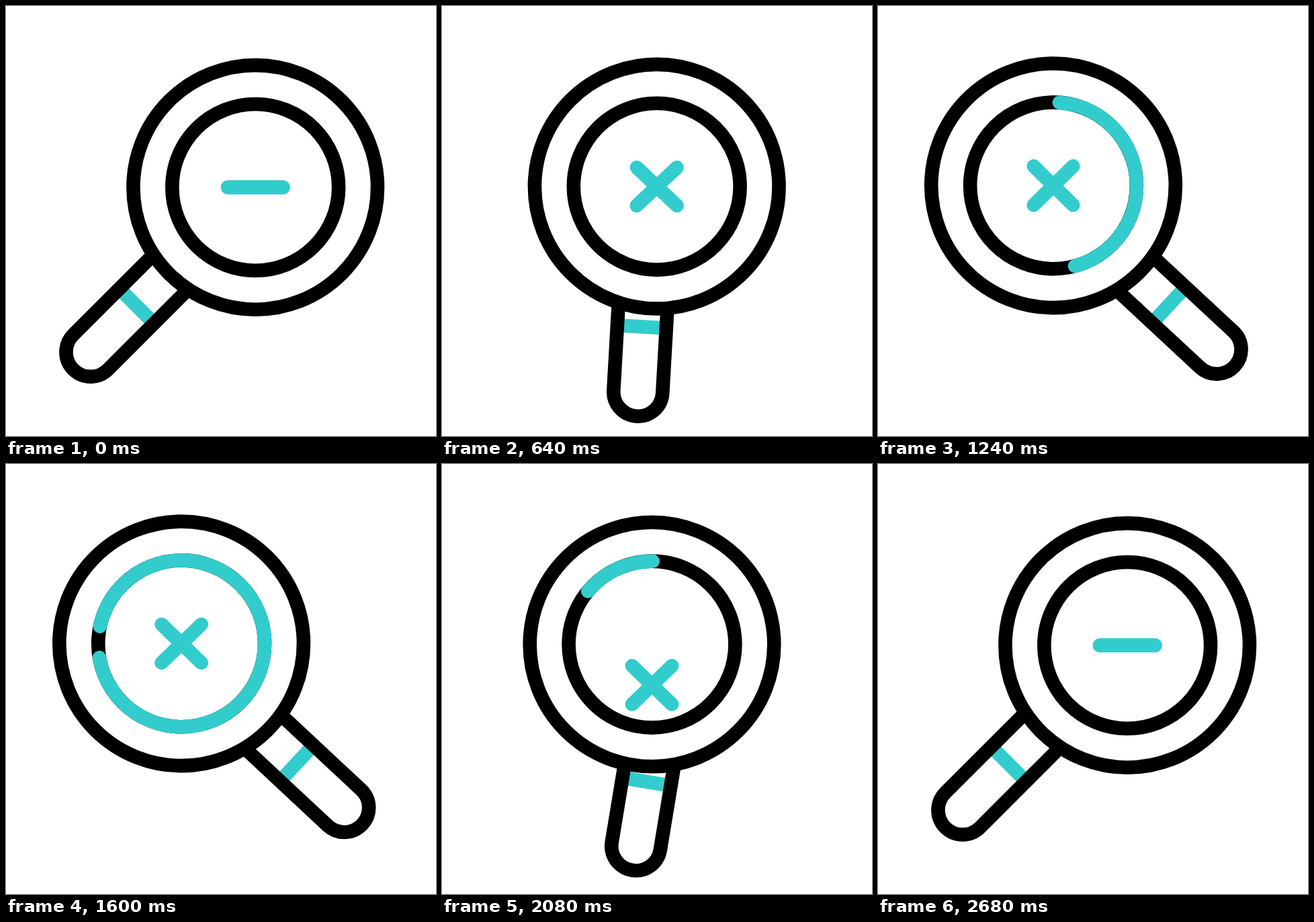
An HTML page that plays this animation: 640x640 px, repeating every 3000 ms.

```html
<!DOCTYPE html>
<html lang="en">
<head>
<meta charset="utf-8">
<title>Magnifier</title>
<style>
  html, body { margin: 0; width: 100%; height: 100%; overflow: hidden; background: #fff; }
  svg { display: block; width: 100%; height: 100%; }
</style>
</head>
<body>
<svg viewBox="0 0 640 640" fill="none" stroke="#000" stroke-width="20.6">
  <defs>
    <clipPath id="glass"><circle r="124"/></clipPath>
  </defs>
  <g id="handle">
    <path d="M-36.5 104H36.5" stroke="#3cc"/>
    <path d="M-36.5 0V201A36.5 36.5 0 0 0 36.5 201V0"/>
  </g>
  <g id="lens">
    <circle r="181.8" fill="#fff"/>
    <g clip-path="url(#glass)">
      <g id="sign" stroke="#3cc" stroke-linecap="round">
        <path id="armA" d="M-41.2 0H41.2"/>
        <path id="armB" d="M-41.2 0H41.2"/>
      </g>
    </g>
    <circle r="123.9"/>
    <path id="arc" stroke="#3cc" stroke-linecap="round"/>
  </g>
</svg>
<script>
const LOOP = 3000, RING = 123.9;
const SWING = 1100, GO = 120, BACK = 1560;
const [handle, lens, sign, armA, armB, arc] =
  ['handle', 'lens', 'sign', 'armA', 'armB', 'arc'].map(id => document.getElementById(id));

const clamp = v => Math.min(1, Math.max(0, v));
const span = (t, from, to) => clamp((t - from) / (to - from));
const mix = (a, b, k) => a + (b - a) * k;
const smooth = u => u * u * (3 - 2 * u);

// Cubic Bezier easing with flat ends, solved by bisection.
function ease(u, x1, x2) {
  if (u <= 0 || u >= 1) return clamp(u);
  let lo = 0, hi = 1;
  for (let i = 0; i < 24; i++) {
    const s = (lo + hi) / 2, r = 1 - s;
    if (3 * x1 * s * r * r + 3 * x2 * s * s * r + s * s * s < u) lo = s; else hi = s;
  }
  return smooth(lo);
}

function placeHandle(u, back) {
  const dir = k => back ? 1 - k : k;
  const move = dir(ease(u, 0.665, 0.363));
  const turn = dir(back ? ease(u, 0.575, 0.246) : ease(u, 0.74, 0.22));
  const dip = back ? 3.6 * Math.sin(Math.PI * move) : 0;
  const x = mix(268.1, 356.8, move), y = mix(373, 374.3, move) - dip;
  handle.setAttribute('transform', `translate(${x} ${y}) rotate(${mix(45, -47.1, turn)})`);
}

function placeLens(u, back) {
  const k = ease(u, 0.678, 0.278), p = back ? 1 - k : k;
  lens.setAttribute('transform', `translate(${mix(371.2, 261, p)} ${mix(269.9, 267.3, p)})`);
}

function placeSign(t) {
  let angle = 0, y = 0;
  if (t < 2200) {
    angle = 43.5 * smooth(span(t, 180, 640))
      + 2.7 * smooth(span(t, 640, 960))
      - 2.2 * smooth(span(t, 960, 1400));
    y = 135 * span(t, 1840, 2200) ** 2;
  } else {
    y = -135 * (1 - span(t, 2200, 2480)) ** 2;
  }
  sign.setAttribute('transform', `translate(0 ${y})`);
  armA.setAttribute('transform', `rotate(${angle})`);
  armB.setAttribute('transform', `rotate(${-angle})`);
}

function point(deg) {
  const a = deg * Math.PI / 180;
  return `${RING * Math.cos(a)} ${RING * Math.sin(a)}`;
}

// The sweep opens both ways, then its tail catches up with its head.
function drawArc(t) {
  const grow = smooth(span(t, 808, 1740));
  const tail = -11.45 - 166.6 * grow + 470.6 * (1 - (1 - span(t, 1661, 2568)) ** 3);
  const head = -11.45 + 193.4 * grow + 110.6 * (1 - (1 - span(t, 1652, 2426)) ** 2);
  const size = Math.min(head - tail, 359.9);
  if (size < 0.9) return arc.setAttribute('d', '');
  const r = `A${RING} ${RING} 0 0 1 `;
  arc.setAttribute('d', `M${point(tail)}${r}${point(tail + size / 2)}${r}${point(tail + size)}`);
}

function draw(t) {
  const back = t >= BACK;
  const u = clamp((t - (back ? BACK : GO)) / SWING);
  placeHandle(u, back);
  placeLens(u, back);
  placeSign(t);
  drawArc(t);
}

const start = performance.now();
function tick(now) {
  draw(Math.max(0, now - start) % LOOP);
  requestAnimationFrame(tick);
}
draw(0);
requestAnimationFrame(tick);
</script>
</body>
</html>
```
